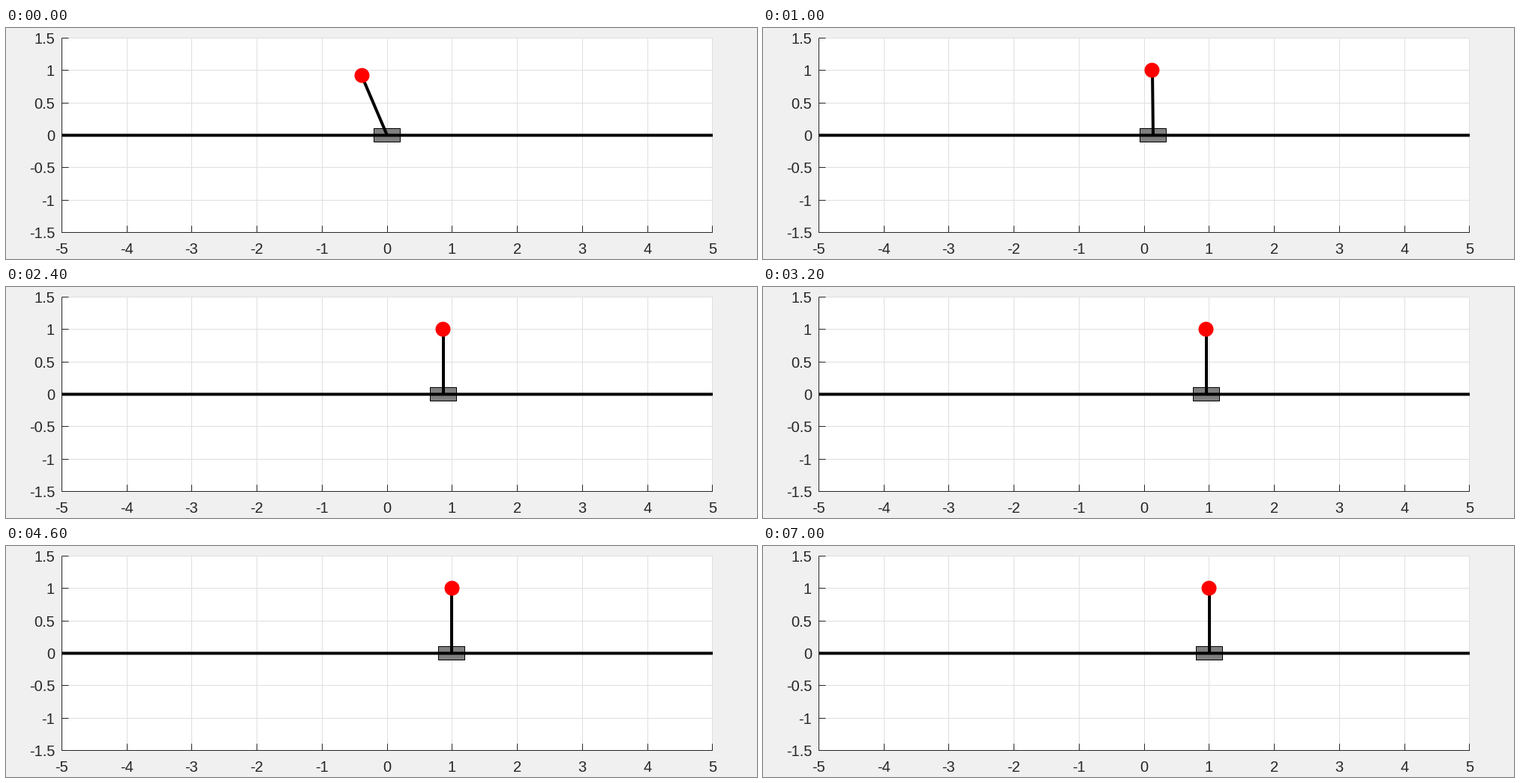
A matplotlib script that plays this animation: 1001x309 px, repeating every 8 s.

```python
import numpy as np
import matplotlib.pyplot as plt
from matplotlib.animation import FuncAnimation
from matplotlib.patches import Circle, Rectangle

WIDTH, HEIGHT, DPI = 1001, 309, 100
FRAMES, INTERVAL = 80, 100
PX = 72 / DPI                      # one pixel in points
UNIT = 86.75                       # pixels per axis unit
X0, Y0 = 508.15, 143.5             # pixel position of the axis origin
INK, GRID = "#262626", "#dfdfdf"

# Closed-loop cart-pole: poles per second, and rod length / gravity
POLES = np.array([-1.344, -4.38, -13 + 11.47j, -13 - 11.47j])
FALL = 0.0125
TILT = 0.4                         # starting lean to the left, in radians
GOAL = 1.0

# Modal amplitudes from the starting bob error and its derivatives
START = [GOAL + TILT, 0, TILT / FALL, 0]
MODES = np.linalg.solve(np.vander(POLES, 4, increasing=True).T, START)


def pose(t):
    """Cart position and lean angle at time t in seconds."""
    terms = MODES * np.exp(POLES * t)
    bob_error = terms.sum().real
    lean = FALL * (terms * POLES**2).sum().real
    return GOAL - bob_error + lean, lean


def px(x):
    return X0 + UNIT * x


def py(y):
    return Y0 - UNIT * y


def mid(v):
    """Centre of the pixel that holds v."""
    return np.floor(v) + 0.5


fig = plt.figure(figsize=(WIDTH / DPI, HEIGHT / DPI), dpi=DPI, facecolor="#f0f0f0")
ax = fig.add_axes([0, 0, 1, 1])
ax.set_xlim(0, WIDTH)
ax.set_ylim(HEIGHT, 0)
ax.axis("off")

LEFT, RIGHT = mid(px(-5)), mid(px(5))
TOP, BOTTOM = 13.5, 273.5


def stroke(xs, ys, width=1, color=INK, z=2):
    # Lines already sit on pixel centres, so snapping would shift them
    return ax.plot(xs, ys, color=color, lw=width * PX, zorder=z,
                   solid_capstyle="butt", snap=False)[0]


def label(x, y, value, align):
    ax.text(x, y, f"{value:g}", color=INK, ha=align, va="baseline",
            family="Liberation Sans", fontsize=20 * PX)


ax.add_patch(Rectangle((LEFT, TOP), RIGHT - LEFT, BOTTOM - TOP,
                       fc="white", ec="none", zorder=0, snap=False))

for value in range(-5, 6):
    x = mid(px(value))
    stroke([x, x], [TOP, BOTTOM], color=GRID, z=1)
    stroke([x, x], [BOTTOM, BOTTOM - 9])
    label(px(value) - 0.5, 302, value, "center")

for value in np.arange(-1.5, 1.6, 0.5):
    y = np.clip(mid(py(value)), TOP, BOTTOM)
    stroke([LEFT, RIGHT], [y, y], color=GRID, z=1)
    stroke([LEFT, LEFT + 9], [y, y])
    label(65, y + 7.5, value, "right")

stroke([LEFT, LEFT], [TOP, BOTTOM + 0.5])
stroke([LEFT, RIGHT + 0.5], [BOTTOM, BOTTOM])

cart = Rectangle((0, 134.5), 35, 18, fc="#808080", ec="black", lw=PX,
                 joinstyle="round", zorder=3, snap=False)
ax.add_patch(cart)
stroke([LEFT, RIGHT + 0.5], [Y0, Y0], 4, "black", 4)
rod = stroke([], [], 4, "black", 5)
bob = Circle((0, 0), 10, fc="red", ec="none", zorder=6, snap=False)
ax.add_patch(bob)


def draw(frame):
    x, lean = pose(frame * INTERVAL / 1000)
    bob_x, bob_y = px(x - np.sin(lean)), py(np.cos(lean))
    left, right = mid(px(x - 0.2)), mid(px(x + 0.2))
    cart.set_x(left)
    cart.set_width(right - left)
    rod.set_data([np.round(bob_x), np.round(px(x))], [bob_y, Y0])
    bob.center = mid(bob_x), mid(bob_y)
    return cart, rod, bob


anim = FuncAnimation(fig, draw, frames=FRAMES, interval=INTERVAL,
                     repeat=True, repeat_delay=0, blit=False)
plt.show()
```
